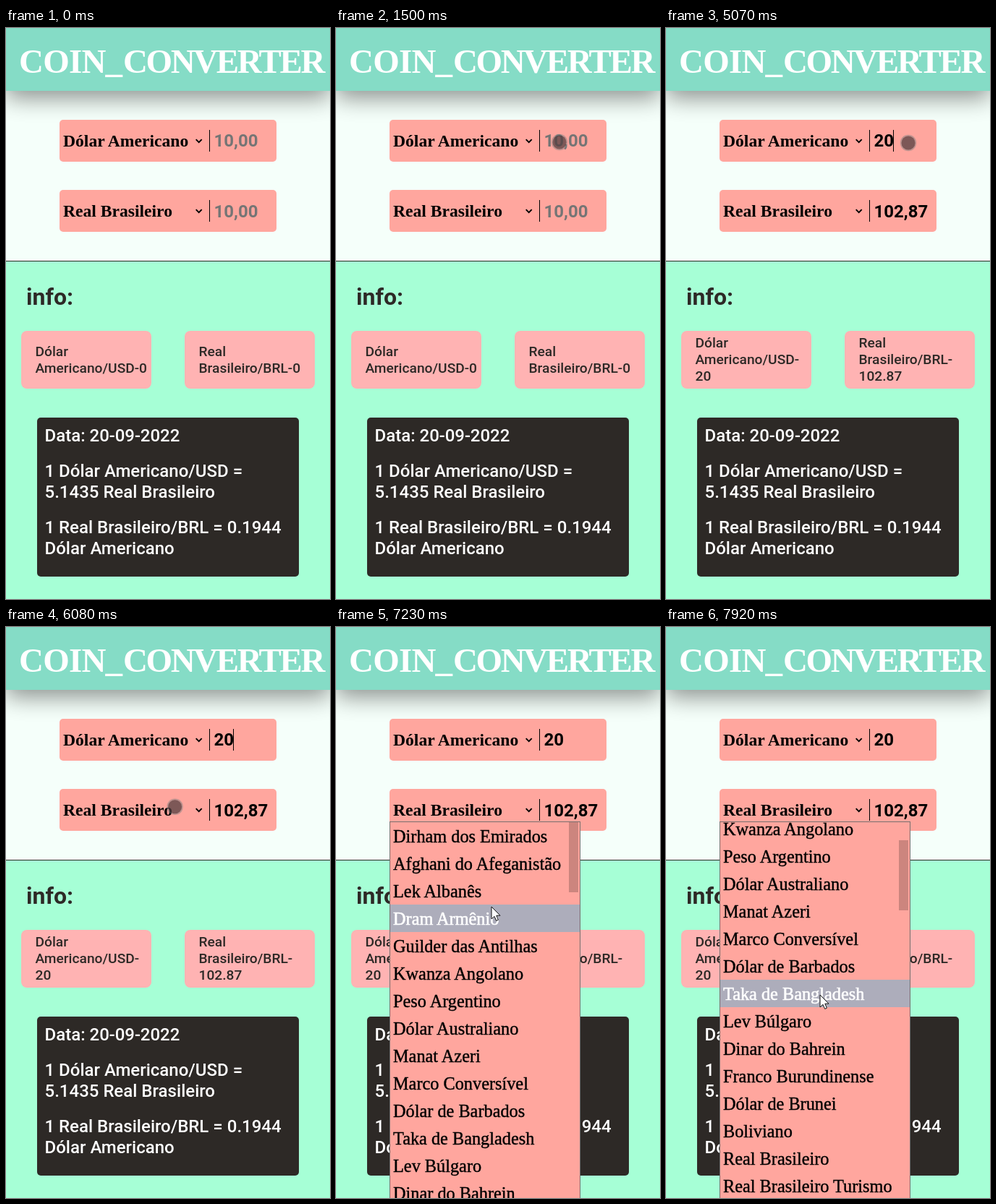
Recreate the animation shown at these times as an HTML page. Size 448 px wide and 790 px high, loop 7.99 s.

```html
<!DOCTYPE html>
<html lang="pt-BR">
<head>
<meta charset="utf-8">
<title>Coin converter</title>
<style>
  html, body { margin: 0; width: 100%; height: 100%; overflow: hidden; background: #f5fffa; }
  svg { display: block; width: 448px; height: 790px; }
  text { white-space: pre; }
  .title { font: bold 47px "Liberation Serif", serif; letter-spacing: -.8px; fill: #fff; }
  .tight { letter-spacing: -2.4px; }
  .select { font: bold 23.6px "Liberation Serif", serif; }
  .option { font: 24.3px "Liberation Serif", serif; fill: #000; stroke: #000; stroke-width: .4px; }
  .option.on { fill: #fff; stroke: #fff; stroke-width: .6px; }
  .value { font: bold 24px Roboto, sans-serif; }
  .hint { fill: #757575; }
  .info { font: bold 32px Roboto, sans-serif; fill: #2d2926; }
  .card { font: 500 19.2px Roboto, sans-serif; fill: #2d2926; }
  .rate { font: 500 24px Roboto, sans-serif; fill: #fff; }
</style>
</head>
<body>
<svg viewBox="0 0 448 790">
  <defs>
    <filter id="soft" filterUnits="userSpaceOnUse" x="-80" y="-80" width="608" height="300">
      <feGaussianBlur stdDeviation="16"/>
    </filter>
    <clipPath id="menuClip"><rect x="75" y="270" width="262" height="520"/></clipPath>
  </defs>

  <rect width="448" height="790" fill="#f5fffa"/>
  <rect y="10" width="448" height="87" opacity=".43" filter="url(#soft)"/>
  <rect width="448" height="87" fill="#85dcc6"/>
  <text class="title" x="18" y="62">COIN_<tspan class="tight" x="162">CONVERTER</tspan></text>

  <g id="fields"></g>

  <rect y="322" width="448" height="468" fill="#a6ffd6"/>
  <rect y="322" width="448" height="1" fill="#2d2926"/>
  <text class="info" x="28" y="383">info:</text>
  <g fill="#ffb3b3">
    <rect x="21" y="419" width="180" height="80" rx="8"/>
    <rect x="247" y="419" width="180" height="80" rx="8"/>
  </g>
  <g id="cards"></g>
  <rect x="43" y="539" width="362" height="220" rx="5" fill="#2d2926"/>
  <g id="rates"></g>

  <rect id="caret" y="141" width="1" height="30"/>

  <g id="menu">
    <rect x="74.5" y="269.5" width="263" height="530" fill="#ffa69e" stroke="#77706f"/>
    <g clip-path="url(#menuClip)">
      <rect id="mark" x="75" width="262" height="38" fill="#adadbb"/>
      <g id="options"></g>
      <rect id="thumb" x="322" width="13" height="97" fill="#cc857e"/>
    </g>
  </g>

  <g id="touch">
    <circle r="11.2" fill="#808080" fill-opacity=".5"/>
    <circle id="core" r="9.5" fill="#3c1e20"/>
  </g>
  <path id="arrow" d="M0 0V17L4 13.3L6.7 19.4L9.4 18.2L6.8 12.2H12Z" fill="#fff" stroke="#111" stroke-linejoin="round"/>
</svg>

<script>
const LOOP = 7990, STEP = 70, ROW = 38, TOP = 270;
const $ = id => document.getElementById(id);

function add(parent, tag, attrs, content) {
  const el = document.createElementNS("http://www.w3.org/2000/svg", tag);
  for (const name in attrs) el.setAttribute(name, attrs[name]);
  if (content) el.textContent = content;
  return parent.appendChild(el);
}

function addField(y, label, valueY) {
  const box = $("fields");
  add(box, "rect", { x: 74, y, width: 300, height: 58, rx: 5, fill: "#ffa69e" });
  add(box, "text", { class: "select", x: 79, y: y + 37 }, label);
  add(box, "path", { d: `M262.7 ${y + 27.2}l4 4l4 -4`, fill: "none", stroke: "#000", "stroke-width": 1.9 });
  add(box, "rect", { x: 281, y: y + 14, width: 1, height: 30 });
  return add(box, "text", { class: "value", x: 287.5, y: valueY });
}

const values = [addField(127, "Dólar Americano", 164), addField(224, "Real Brasileiro", 262)];

const cards = [40.5, 266.5].map(x =>
  [0, 1, 2].map(() => add($("cards"), "text", { class: "card", x })));

[[572, "Data: 20-09-2022"],
 [621, "1 Dólar Americano/USD ="], [650, "5.1435 Real Brasileiro"],
 [699, "1 Real Brasileiro/BRL = 0.1944"], [728, "Dólar Americano"]]
  .forEach(([y, line]) => add($("rates"), "text", { class: "rate", x: 53.5, y }, line));

const options = ["Dirham dos Emirados", "Afghani do Afeganistão", "Lek Albanês", "Dram Armênio",
  "Guilder das Antilhas", "Kwanza Angolano", "Peso Argentino", "Dólar Australiano", "Manat Azeri",
  "Marco Conversível", "Dólar de Barbados", "Taka de Bangladesh", "Lev Búlgaro", "Dinar do Bahrein",
  "Franco Burundinense", "Dólar de Brunei", "Boliviano", "Real Brasileiro", "Real Brasileiro Turismo"]
  .map((name, i) => add($("options"), "text", { class: "option", x: 79, y: TOP + 28 + i * ROW }, name));

// Pointer runs: start time, number of steps, from x, y, to x, y
const touchRuns = [
  [260, 4, 434, 746, 404, 577], [540, 3, 380, 520, 320, 420],
  [750, 3, 280, 310, 229, 190], [960, 2, 216, 162, 250, 158],
  [1100, 5, 256, 158, 292, 158], [1500, 3, 309, 158, 346, 158],
  [1840, 3, 340, 159, 324, 159], [2120, 10, 327, 159, 354, 159],
  [2870, 1, 351, 159, 351, 159], [5070, 3, 335, 159, 329, 159],
  [5540, 9, 322, 163, 221, 261], [6220, 1, 219, 267, 219, 267]];
const arrowRuns = [
  [6950, 4, 219, 268, 216, 345], [7230, 3, 215, 387, 214, 454], [7570, 4, 214, 470, 213, 509]];

function place(runs, t) {
  const run = runs.filter(r => r[0] <= t).pop();
  if (!run) return null;
  const [start, n, x0, y0, x1, y1] = run;
  const k = n > 1 ? Math.min(1, Math.floor((t - start) / STEP) / (n - 1)) : 1;
  return [x0 + (x1 - x0) * k, y0 + (y1 - y0) * k];
}

const caretTimes = [[2260, 2800], [3290, 4280], [4740, 5210], [5740, 6220]];

function show(el, on) { el.style.display = on ? "" : "none"; }
function move(el, [x, y]) { el.setAttribute("transform", `translate(${x} ${y})`); }

function setCard(lines, texts) {
  lines.forEach((line, i) => {
    line.textContent = texts[i] || "";
    line.setAttribute("y", (texts.length > 2 ? 442 : 454) + i * 23);
  });
}

let lastTyped = null;
function setValues(typed) {
  if (typed === lastTyped) return;
  lastTyped = typed;
  const result = { "": "", "2": "10.287", "20": "102.87" }[typed];
  [typed, result.replace(".", ",")].forEach((v, i) => {
    values[i].textContent = v || "10,00";
    values[i].classList.toggle("hint", !v);
  });
  setCard(cards[0], typed === "20" ? ["Dólar", "Americano/USD-", "20"]
                                  : ["Dólar", "Americano/USD-" + (typed || 0)]);
  setCard(cards[1], result ? ["Real", "Brasileiro/BRL-", result] : ["Real", "Brasileiro/BRL-0"]);
}

function draw(t) {
  const typed = t < 3550 ? "" : t < 3750 ? "2" : "20";
  setValues(typed);
  show($("caret"), caretTimes.some(([a, b]) => t >= a && t < b));
  $("caret").setAttribute("x", 287 + Math.round(typed.length * 13.5));

  const touch = t < 6950 && place(touchRuns, t);
  show($("touch"), touch);
  if (touch) move($("touch"), touch);
  $("core").setAttribute("fill-opacity", t >= 6420 ? .56 : .5);

  const scroll = t < 7850 ? 0 : t < 7920 ? 100 : 200;
  const arrow = place(arrowRuns, t);
  show($("menu"), t >= 6490);
  show($("arrow"), arrow);
  show($("mark"), arrow);
  move($("options"), [0, -scroll]);
  $("thumb").setAttribute("y", TOP + scroll / 8);

  const row = arrow ? Math.max(0, Math.floor((arrow[1] + scroll - TOP) / ROW)) : -1;
  options.forEach((o, i) => o.classList.toggle("on", i === row));
  if (arrow) {
    move($("arrow"), arrow);
    $("mark").setAttribute("y", TOP + row * ROW - scroll);
  }
}

const began = performance.now();
function tick() {
  draw((performance.now() - began) % LOOP);
  requestAnimationFrame(tick);
}
tick();
</script>
</body>
</html>
```
